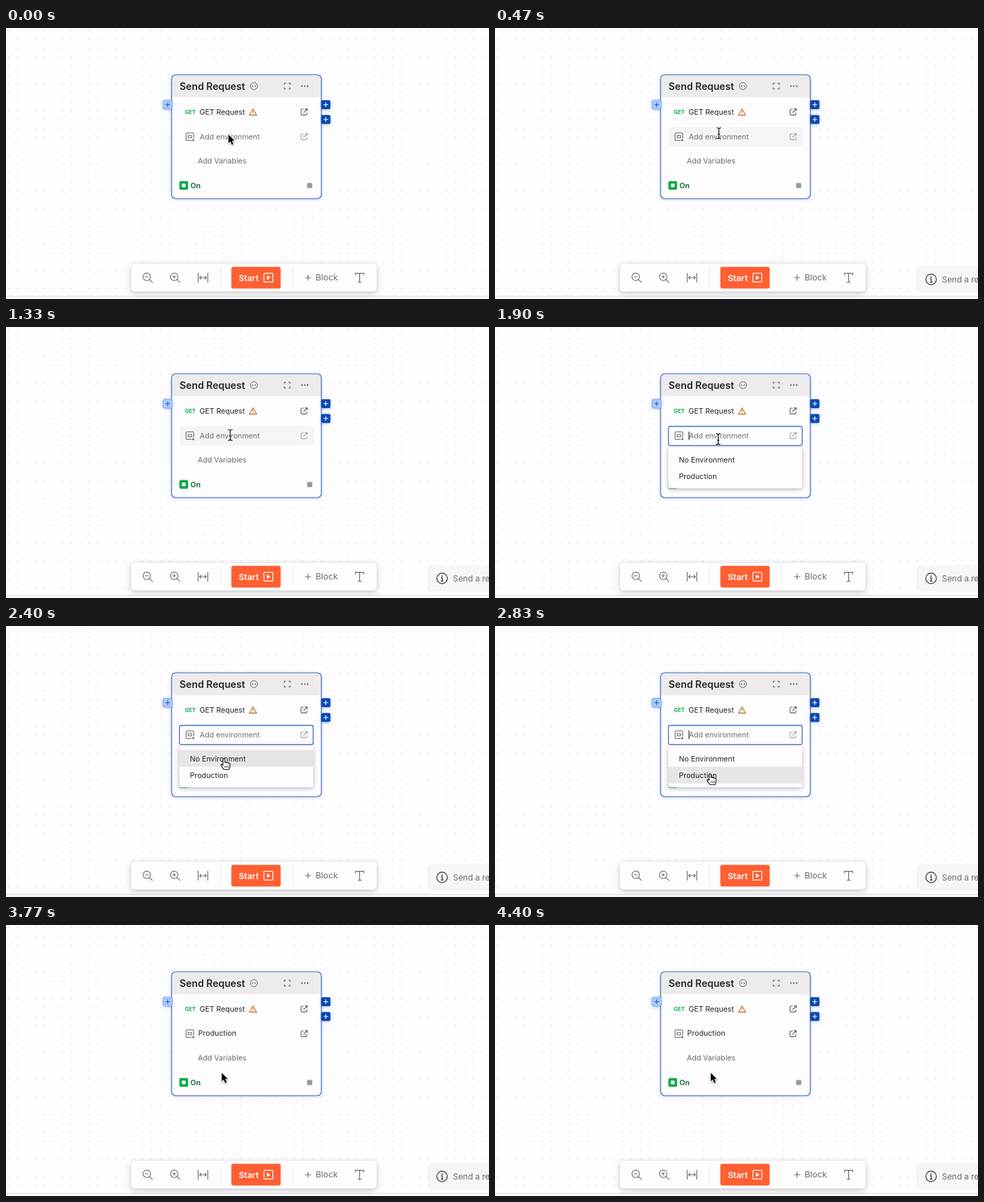
Write an HTML page with a canvas that moves like this. It is 700 px wide and 394 px high and loops after 4430 ms.

```html
<!DOCTYPE html>
<html lang="en">
<head>
<meta charset="utf-8">
<title>Send Request block</title>
<style>
html, body { margin: 0; width: 100%; height: 100%; overflow: hidden; background: #fdfcfe; }
canvas { display: block; width: 100vw; height: 100vh; }
</style>
</head>
<body>
<canvas id="stage"></canvas>
<script>
const W = 700, H = 394, LOOP = 4430;
const HOVER_AT = 100, OPEN_AT = 1650, CLOSE_AT = 3300, BLINK = 500;
const canvas = document.getElementById('stage');
const ctx = canvas.getContext('2d');
const PAPER = '#fdfcfe', INK = '#262626', GREY = '#6b6b6b', BLUE = '#3f72c2';

// Pointer hotspot: time, x, y
const POINTER = [
  [0, 322, 154], [350, 324.5, 153], [1100, 324.5, 153], [1300, 325, 157],
  [1800, 325, 157], [2180, 316.5, 192], [2480, 316.5, 192], [2780, 312.3, 214]
];
const ARROW = new Path2D('M0 0V13.6L3.1 10.8 5.5 16.4 8 15.3 5.6 9.8H9.8Z');
const HAND = new Path2D('M-1.6 1.2C-1.6-.5 1.4-.5 1.4 1.2V6C1.8 4.9 4.2 5 4.3 6.6 4.9 5.6 6.9 5.9 7 7.4 7.6 6.7 9.2 7 9.2 8.6V11.5C9.2 13.5 8 14.5 7.8 17H-.3C-.8 15-3.5 12.8-4.5 10.6-5.3 9-3.4 8.2-2.6 9.2L-1.6 10.4Z');
const FINGERS = 'M1.8 11V14.2M4.1 11V14.2M6.4 11V14.2';
const IBEAM = 'M-3.4-8C-1.2-8 0-7.4 0-6 0-7.4 1.2-8 3.4-8M0-6V6M-3.4 8C-1.2 8 0 7.4 0 6 0 7.4 1.2 8 3.4 8M-1.8 1.5H1.8';

const clamp = v => Math.min(1, Math.max(0, v));
const smooth = v => v * v * (3 - 2 * v);

function pointerAt(t) {
  const next = POINTER.findIndex(k => k[0] > t);
  if (next < 0) return POINTER[POINTER.length - 1].slice(1);
  const a = POINTER[next - 1], b = POINTER[next];
  const p = smooth((t - a[0]) / (b[0] - a[0]));
  return [a[1] + (b[1] - a[1]) * p, a[2] + (b[2] - a[2]) * p];
}

function shadow(color, blur, dy = 0) {
  const scale = canvas.width / W;
  ctx.shadowColor = color;
  ctx.shadowBlur = blur * scale;
  ctx.shadowOffsetY = dy * scale;
}

function box(x, y, w, h, r, fill, line, width = 1) {
  ctx.beginPath();
  ctx.roundRect(x, y, w, h, r);
  if (fill) { ctx.fillStyle = fill; ctx.fill(); }
  ctx.shadowColor = 'transparent';
  if (line) { ctx.strokeStyle = line; ctx.lineWidth = width; ctx.stroke(); }
}

function dot(x, y, r, color) {
  ctx.beginPath();
  ctx.arc(x, y, r, 0, Math.PI * 2);
  ctx.fillStyle = color;
  ctx.fill();
}

function icon(x, y, d, color, width = 1) {
  ctx.save();
  ctx.translate(x, y);
  ctx.strokeStyle = color;
  ctx.lineWidth = width;
  ctx.stroke(new Path2D(d));
  ctx.restore();
}

function label(str, x, midY, size, color, weight = 400) {
  ctx.font = `${weight} ${size}px Inter, sans-serif`;
  ctx.fillStyle = color;
  ctx.fillText(str, x, midY + size * 0.364);
}

const plus = (x, y, r, color, width) => icon(x, y, `M${-r} 0H${r}M0 ${-r}V${r}`, color, width);
const openLink = (y, color) => icon(432, y,
  'M-.5-4H-3.2Q-4.4-4-4.4-2.8V3.2Q-4.4 4.4-3.2 4.4H2.8Q4 4.4 4 3.2V.8M1.2-4.4H4.6V-1M4.4-4.2L-.8 1', color, 1.1);

function backdrop() {
  ctx.fillStyle = PAPER;
  ctx.fillRect(0, 0, W, H);
  ctx.fillStyle = '#d3d2d8';
  for (let y = 3.1; y < 388; y += 12.95)
    for (let x = 3.1; x < W; x += 12.95) ctx.fillRect(x, y, 1.1, 1.1);
  ctx.fillStyle = '#f8f8f9';
  ctx.fillRect(0, 390, W, 4);
  ctx.fillStyle = '#e1e1e2';
  ctx.fillRect(0, 389.5, W, 1.2);
}

function port(x, y, fill, line, mark) {
  shadow('rgba(20,60,140,.3)', 4, 1);
  box(x, y - 6.5, 13.4, 13, 2, fill, line);
  plus(x + 6.7, y, 3.3, mark, 1.1);
}

function card() {
  shadow('rgba(30,70,150,.3)', 4, 1);
  box(240, 68, 217, 180, 6, PAPER);
  ctx.save();
  ctx.beginPath();
  ctx.roundRect(240, 68, 217, 180, 6);
  ctx.clip();
  ctx.fillStyle = '#edebec';
  ctx.fillRect(240, 68, 217, 32.5);
  ctx.restore();
  box(240, 68, 217, 180, 6, null, BLUE, 1.2);
  port(227.6, 111.5, '#a6c9fd', '#84aff3', '#2459ae');
  port(456.8, 111.5, '#0a4ab4', null, '#fff');
  port(456.8, 133, '#0a4ab4', null, '#fff');

  label('Send Request', 251.6, 84.5, 14.2, INK, 600);
  icon(359.3, 84.5, 'M5.1 0A5.1 5.1 0 1 1-5.1 0A5.1 5.1 0 1 1 5.1 0', GREY, 1);
  dot(357.3, 84.5, 1, GREY);
  dot(361.3, 84.5, 1, GREY);
  icon(407.6, 84.5, 'M-4.3-1.7V-4.3H-1.7M1.7-4.3H4.3V-1.7M4.3 1.7V4.3H1.7M-1.7 4.3H-4.3V1.7', GREY, 1.1);
  for (const x of [428.8, 433, 437.2]) dot(x, 84.5, 1.15, '#666');

  label('GET', 259.2, 122, 7.8, '#17b055', 700);
  label('GET Request', 280.4, 121.8, 10.75, INK);
  icon(358, 122.3, 'M0-4.8L5.2 4.3H-5.2ZM0-1.8V1.2M0 2.2V3.2', '#b9701b', 1.1);
  openLink(122, '#626262');
}

function environmentRow(t, open, chosen) {
  if (open) box(251.4, 144.5, 193.8, 27.8, 2.5, PAPER, BLUE, 1.3);
  else if (t >= HOVER_AT && !chosen) box(252, 144, 194.5, 28.5, 3, '#f5f4f6');
  icon(266.5, 158, 'M5.5 2.6V-4.2Q5.5-5.5 4.2-5.5H-4.2Q-5.5-5.5-5.5-4.2V4.2Q-5.5 5.5-4.2 5.5H2.6M-2.4-1.7H2.4V1.7H-2.4Z', GREY, 1.1);
  dot(271.4, 163, 1.5, GREY);
  if (chosen) label('Production', 278.6, 157.4, 10.75, INK);
  else label('Add environment', 280.8, 158, 10.75, '#707070');
  openLink(158, chosen ? '#626262' : '#a6a6a6');
  if (open && Math.floor((t - OPEN_AT) / BLINK) % 2 === 0) {
    ctx.fillStyle = '#111';
    ctx.fillRect(280.6, 152, 1, 12.5);
  }
}

function cardFoot() {
  label('Add Variables', 278, 192.8, 10.75, GREY);
  box(251.3, 222.6, 12.6, 12.6, 2, '#0cab45');
  box(254.9, 226.2, 5.4, 5.4, 1, '#fff');
  label('On', 267.2, 228.8, 10.75, '#0a6b2f', 600);
  box(436.4, 225.2, 7.4, 7.6, 1.5, '#999');
}

function dropdown(y) {
  shadow('rgba(0,0,0,.3)', 6, 1.5);
  box(251.2, 175, 194, 59.6, 2.5, PAPER);
  ctx.fillStyle = '#e6e5e7';
  if (y >= 176 && y < 204.6) ctx.fillRect(251.2, 180.4, 194, 24.2);
  if (y >= 204.6) ctx.fillRect(251.2, 204.6, 194, 24.2);
  label('No Environment', 266.4, 192.7, 10.75, INK);
  label('Production', 266.4, 216.7, 10.75, INK);
}

function magnifier(x, mark) {
  icon(x, 361.8, 'M5.4 0A5.4 5.4 0 1 1-5.4 0A5.4 5.4 0 1 1 5.4 0M3.9 3.9L8.6 8.6' + mark, GREY, 1.1);
}

function toolbar() {
  shadow('rgba(0,0,0,.24)', 9, 2);
  box(181.4, 343, 355.6, 40, 5, '#fefdfe');
  magnifier(204, 'M-2.5 0H2.5');
  magnifier(243.8, 'M-2.5 0H2.5M0-2.5V2.5');
  icon(285.5, 363, 'M-7-7V7M7-7V7M-4.8 0H4.8M-2.6-2.4L-5 0-2.6 2.4M2.6-2.4L5 0 2.6 2.4', GREY, 1.1);
  ctx.setLineDash([1, 1.5]);
  icon(311, 363, 'M0-15V15', '#dcdcdc');
  icon(415.5, 363, 'M0-15V15', '#dcdcdc');
  ctx.setLineDash([]);
  box(326.5, 347.2, 71.6, 31.6, 3, '#ff5f32');
  label('Start', 337.2, 363, 12.4, '#fff', 600);
  box(373.8, 356.6, 12.8, 12.8, 1, null, '#fff', 1.2);
  ctx.fillStyle = '#fff';
  ctx.fill(new Path2D('M378.2 359.7L383.4 363 378.2 366.3Z'));
  plus(437.8, 363, 4.3, GREY, 1.1);
  label('Block', 448.8, 363, 12.3, GREY);
  icon(512.5, 363, 'M-6-3.6V-6.4H6V-3.6M0-6.4V6.6M-2.6 6.6H2.6', GREY, 1.2);
}

function toast(t) {
  const p = clamp((t - 150) / 250);
  if (!p) return;
  ctx.save();
  ctx.translate(90 * (1 - smooth(p)), 0);
  shadow('rgba(0,0,0,.09)', 5, 0.5);
  box(613.8, 347.8, 260, 34.4, 4, '#f6f5f7');
  icon(632, 365.5, 'M7.6 0A7.6 7.6 0 1 1-7.6 0A7.6 7.6 0 1 1 7.6 0M-1.5-.8H.2V3.8M-1.7 3.8H2', '#333', 1.2);
  dot(632, 362.2, 1, '#333');
  label('Send a request', 647.8, 365.5, 11.9, GREY);
  ctx.restore();
}

function cursor(t, open, x, y) {
  ctx.save();
  ctx.translate(x, y);
  ctx.lineJoin = 'round';
  if (t < HOVER_AT || t >= CLOSE_AT) {
    ctx.translate(0.4, 1);
    ctx.scale(0.9, 0.9);
    ctx.strokeStyle = '#fff';
    ctx.lineWidth = 2;
    shadow('rgba(0,0,0,.35)', 2, 1);
    ctx.stroke(ARROW);
    ctx.shadowColor = 'transparent';
    ctx.fillStyle = '#000';
    ctx.fill(ARROW);
  } else if (open && y > 174) {
    ctx.translate(-0.6, 0.8);
    ctx.scale(0.94, 0.94);
    ctx.fillStyle = '#fff';
    ctx.fill(HAND);
    ctx.strokeStyle = '#111';
    ctx.lineWidth = 1.2;
    ctx.stroke(HAND);
    icon(0, 0, FINGERS, '#111', 0.8);
  } else {
    icon(0, 0, IBEAM, '#fff', 2.6);
    icon(0, 0, IBEAM, '#111', 1.2);
  }
  ctx.restore();
}

function fit() {
  const ratio = window.devicePixelRatio || 1;
  const w = Math.round(innerWidth * ratio), h = Math.round(innerHeight * ratio);
  if (canvas.width !== w || canvas.height !== h) {
    canvas.width = w;
    canvas.height = h;
  }
  ctx.setTransform(w / W, 0, 0, h / H, 0, 0);
}

function draw(t) {
  const open = t >= OPEN_AT && t < CLOSE_AT;
  const [x, y] = pointerAt(t);
  fit();
  backdrop();
  card();
  environmentRow(t, open, t >= CLOSE_AT);
  cardFoot();
  if (open) dropdown(y);
  toolbar();
  toast(t);
  cursor(t, open, x, y);
}

const start = performance.now();
function tick() {
  draw((performance.now() - start) % LOOP);
  requestAnimationFrame(tick);
}
tick();
</script>
</body>
</html>
```
